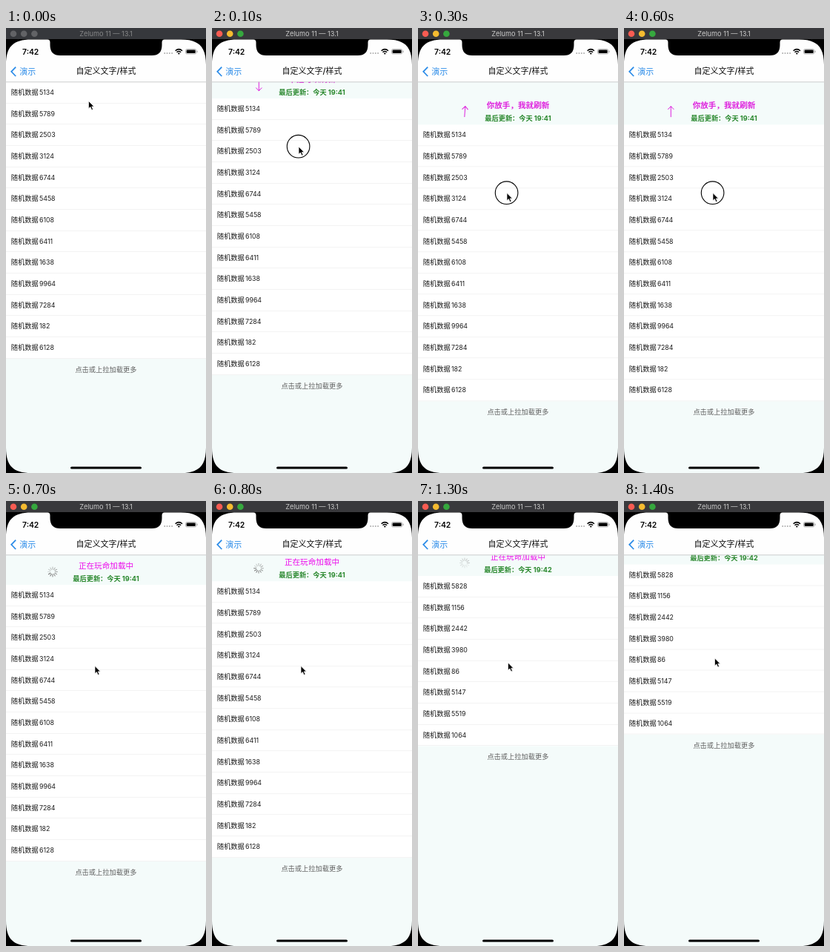
An HTML page for the animation above (1.5 s loop, 270 px wide and 600 px high).

```html
<!DOCTYPE html>
<html lang="zh-CN">
<head>
<meta charset="utf-8">
<title>自定义文字/样式</title>
<style>
  html, body { margin: 0; width: 100%; height: 100%; overflow: hidden; background: #000; }
  svg { display: block; width: 270px; height: 600px; font-family: Inter, "Noto Sans CJK SC", "Noto Sans CJK", sans-serif; }
  .mid { text-anchor: middle; }
  .row { font-size: 9.25px; fill: #1c1c1c; }
  .num { font-size: 8.8px; }
  .line { stroke: #f3f3f3; stroke-width: 1; }
</style>
</head>
<body>
<svg viewBox="0 0 270 600">
  <rect y="15" width="270" height="585" fill="#f4fbfa"/>

  <g id="header">
    <text id="state" class="mid" x="135" y="-22" font-size="10.6" font-weight="700"></text>
    <text id="time" class="mid" x="135" y="-5.2" font-size="9.2" font-weight="700" fill="#2a882e"></text>
    <path id="arrow" d="M0-7.3V7.3M-4 3L0 7.3L4 3" fill="none"/>
    <g id="spinner" transform="translate(63 -17.5)" stroke-width="1.1" stroke-linecap="round"></g>
  </g>
  <g id="list"></g>

  <rect y="15" width="270" height="57.5" fill="#fefefe"/>
  <path d="M0 72.8H270" stroke="#c4c4c4" stroke-width=".8"/>
  <path d="M13.2 52.6L7.2 58.8L13.2 65" fill="none" stroke="#2a8be8" stroke-width="1.7"/>
  <text x="18.3" y="62.6" font-size="11" fill="#2a8be8">演示</text>
  <text class="mid" x="135" y="62.4" font-size="11" font-weight="500" fill="#111">自定义文字/样式</text>

  <text x="22" y="35.6" font-size="10.4" font-weight="600">7:42</text>
  <path d="M214.2 34H226" stroke="#aaa" stroke-width="1.9" stroke-linecap="round" stroke-dasharray="0 3.3"/>
  <g fill="none" stroke="#000" stroke-width="1.5">
    <path d="M228.6 30.7Q233.3 26.5 238 30.7M230.5 32.8Q233.3 30.3 236.1 32.8"/>
  </g>
  <path d="M231.8 34.2Q233.3 33 234.8 34.2L233.3 35.8Z"/>
  <rect x="242.5" y="28.5" width="14.3" height="6.6" rx="2" fill="none" stroke="#999" stroke-width=".7"/>
  <rect x="243.6" y="29.6" width="12.1" height="4.4" rx="1.1"/>
  <path d="M258 30.6v2.4" stroke="#999"/>
  <rect x="87" y="591.4" width="96" height="3.2" rx="1.6"/>

  <path fill-rule="evenodd" d="M0 15H270V600H0Z
    M34 15.6H56Q59.5 15.6 59.5 19.6V23Q59.5 37 73 37H197Q210.5 37 210.5 23V19.6Q210.5 15.6 214 15.6H236
    C260.3 15.6 270 25.3 270 49.6V566C270 590.3 260.3 600 236 600H34C9.7 600 0 590.3 0 566V49.6C0 25.3 9.7 15.6 34 15.6Z"/>
  <rect id="bar" width="270" height="15"/>
  <g id="lights"></g>
  <text id="device" class="mid" x="135" y="11.3" font-size="9.2">Zelumo 11 — 13.1</text>

  <g id="pointer">
    <circle id="touch" cx="-.4" cy="-.3" r="15.3" fill="none" stroke="#000" stroke-width="1.1"/>
    <path d="M0 0V10.2L2.4 8L4.2 12L6 11.2L4.3 7.4H7.4Z" stroke="#fff" stroke-width=".7"/>
  </g>
</svg>
<script>
const $ = id => document.getElementById(id);
const LOOP = 1500, TICK = 100, TOP = 73, ROW = 28.68;
const before = [5134, 5789, 2503, 3124, 6744, 5458, 6108, 6411, 1638, 9964, 7284, 182, 6128];
const after = [5828, 1156, 2442, 3980, 86, 5147, 5519, 1064];

// Each step holds until the next one starts.
const steps = [
  { at: 0, pull: 0, x: 111.5, y: 98.5, mode: 'idle' },
  { at: 100, pull: 22, x: 117, y: 160, touch: true, mode: 'pull' },
  { at: 200, pull: 45.7, x: 120.2, y: 212.6, turn: -6, touch: true, mode: 'release', ink: '#e64be6' },
  { at: 300, pull: 57.3, x: 120, y: 222.5, turn: -176, touch: true, mode: 'release' },
  { at: 400, pull: 57.3, x: 120, y: 222.5, turn: -180, touch: true, mode: 'release' },
  { at: 700, pull: 40, x: 120, y: 222.5, mode: 'load' },
  { at: 800, pull: 35.2, x: 120, y: 222.5, mode: 'load' },
  { at: 1300, pull: 28, x: 121.5, y: 218, mode: 'done' },
  { at: 1400, pull: 12.6, x: 122.5, y: 212, mode: 'idle', fresh: true }
];
const labels = {
  idle: '下拉可以刷新', pull: '下拉可以刷新', release: '你放手，我就刷新',
  load: '正在玩命加载中', done: '正在玩命加载中'
};

function listMarkup(values) {
  const end = values.length * ROW;
  const rows = values.map((v, i) => {
    const y = i * ROW;
    return `<text class="row" x="6.8" y="${y + 17}">随机数据<tspan class="num" x="45">${v}</tspan></text>` +
      `<path class="line" d="M0 ${Math.round(y + ROW) - .5}H270"/>`;
  });
  return `<rect width="270" height="${end}" fill="#fff"/>${rows.join('')}` +
    `<text class="mid" x="135" y="${end + 18}" font-size="9.25" font-weight="500" fill="#606060">点击或上拉加载更多</text>`;
}

const lights = ['#f95c52', '#f5bb30', '#36a83e'];
$('lights').innerHTML = lights.map((c, i) => `<circle cx="${10 + 14.2 * i}" cy="7.8" r="4.3"/>`).join('');
$('spinner').innerHTML = Array.from({ length: 12 }, (_, i) =>
  `<path d="M0-3.4V-6.4" transform="rotate(${i * 30})" stroke="#777"/>`).join('');

let shown;
function draw(t) {
  const s = steps.findLast(step => step.at <= t);
  const focused = t >= 100, fresh = s.fresh || s.mode === 'done';
  const loading = s.mode === 'load' || s.mode === 'done';
  const values = fresh ? after : before;
  if (shown !== values) $('list').innerHTML = listMarkup(shown = values);

  const top = `translate(0 ${TOP + s.pull})`;
  $('list').setAttribute('transform', top);
  $('header').setAttribute('transform', top);

  const ink = s.ink || (loading ? '#ec0cec' : '#de22de');
  $('state').textContent = labels[s.mode];
  $('state').setAttribute('fill', ink);
  $('state').setAttribute('font-weight', loading ? 400 : 700);
  $('time').textContent = '最后更新：今天 ' + (fresh ? '19:42' : '19:41');

  $('arrow').setAttribute('stroke', ink);
  $('arrow').setAttribute('transform', `translate(63.3 -17.5) rotate(${s.turn || 0})`);
  $('arrow').style.display = loading || s.fresh ? 'none' : '';
  $('spinner').style.display = loading ? '' : 'none';
  $('spinner').style.opacity = s.mode === 'done' ? .4 : 1;
  const head = Math.floor(t / 1000 * 12);
  [...$('spinner').children].forEach((p, i) => {
    p.style.opacity = 1 - ((head - i + 24) % 12) * .065;
  });

  $('bar').setAttribute('fill', focused ? '#39393c' : '#36383c');
  $('device').setAttribute('fill', focused ? '#c8c8c8' : '#858687');
  [...$('lights').children].forEach((c, i) => c.setAttribute('fill', focused ? lights[i] : '#626366'));
  $('pointer').setAttribute('transform', `translate(${s.x} ${s.y})`);
  $('touch').style.display = s.touch ? '' : 'none';
}

const start = performance.now();
function loop() {
  const t = (performance.now() - start) % LOOP;
  draw(Math.floor(t / TICK) * TICK);
  requestAnimationFrame(loop);
}
loop();
</script>
</body>
</html>
```
